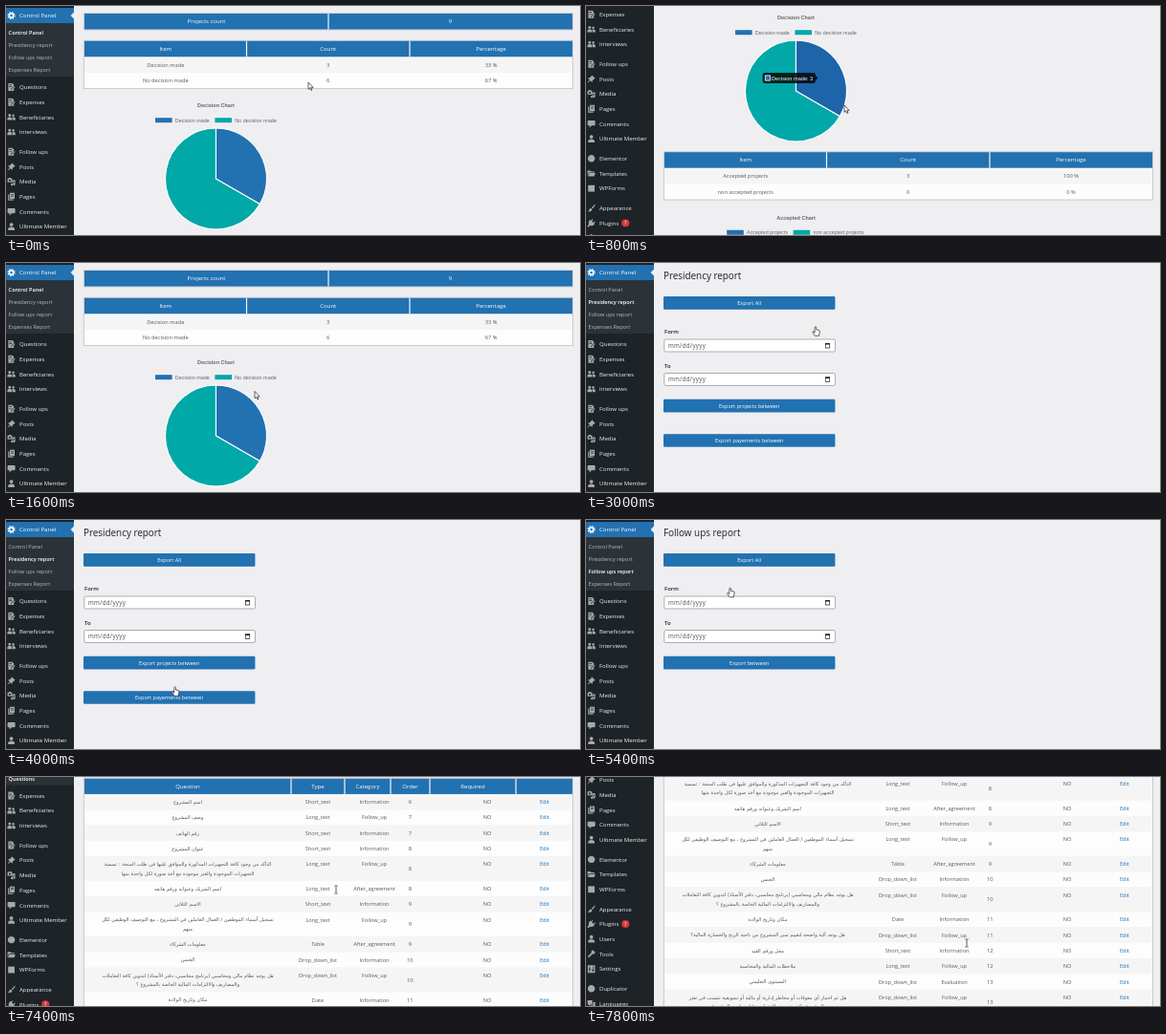
Recreate the animation shown at these times as an HTML page. Size 600 px wide and 240 px high, loop 8 s.

```html
<!DOCTYPE html>
<html lang="en">
<head>
<meta charset="utf-8">
<title>Control Panel</title>
<style>
html, body { margin: 0; width: 100%; height: 100%; overflow: hidden; background: #efeef1; }
svg { display: block; width: 100vw; height: 100vh; }
text { font-family: "Open Sans", "Noto Sans", sans-serif; white-space: pre; }
.chart { font-family: "Liberation Sans", Arial, sans-serif; }
.ar { font-family: "DejaVu Sans", sans-serif; direction: rtl; }
</style>
</head>
<body>
<svg id="stage" viewBox="0 0 600 240" preserveAspectRatio="none"></svg>
<script>
const NS = "http://www.w3.org/2000/svg";
const stage = document.getElementById("stage");
const BLUE = "#2271b1", TEAL = "#00a8a8", DARK = "#1d2327", SUB = "#2c3338", BG = "#efeef1";
const INK = "#555a60", GREY = "#a7aaad";
const LOOP = 8000, STEP = 200;

function el(parent, tag, attrs = {}, content) {
  const node = document.createElementNS(NS, tag);
  for (const k in attrs) node.setAttribute(k, attrs[k]);
  if (content !== undefined) node.textContent = content;
  return parent.appendChild(node);
}
const group = (p, attrs) => el(p, "g", attrs);
const rect = (p, x, y, w, h, fill, more) => el(p, "rect", { x, y, width: w, height: h, fill, ...more });
const path = (p, d, fill, more) => el(p, "path", { d, fill, ...more });

// y is the middle of the line
function label(p, str, x, y, size, fill, more) {
  return el(p, "text", { x, y: y + size * 0.36, "font-size": size, fill, ...more }, str);
}
const centred = (p, str, x, y, size, fill, more) =>
  label(p, str, x, y, size, fill, { "text-anchor": "middle", ...more });
const show = (node, on) => node.setAttribute("display", on ? "inline" : "none");

// ---------- sidebar ----------
const ICONS = {
  form: "M-3.2-4H1L2.6-2.4V-1L-.4 2V3H.8L2.6 1.4V4H-3.2ZM-2.2-2.4V-1.7H.6V-2.4ZM-2.2-.8V-.1H.4V-.8ZM3.2-.8L4 0 1 3 0 3.2.2 2.2Z",
  people: "M-1.8-3.4a1.5 1.5 0 1 0 .01 0ZM2-3a1.3 1.3 0 1 0 .01 0ZM-4.2 3.2V1.4Q-4 0-1.8 0T.6 1.4V3.2ZM1.2 3.2V1.4L.8.2Q4.2-.6 4.2 1.6V3.2Z",
  pin: "M.6-4L4-.6 2.9 0 1.2 1.7.9 3.6-1 1.8-3.7 4-4 3.7-1.8 1-3.6-.9-1.7-1.2 0-2.9Z",
  media: "M-4-3.4H-2.8L-2.3-4H-.8L-.3-3.4H.8V.6H-4ZM-1.6-2.4a1 1 0 1 0 .01 0ZM1.6-1.6H4V2.6a1.3 1.2 0 1 1-.9-1.1V0H2V3a1.3 1.2 0 1 1-.9-1.1V-1.6Z",
  pages: "M-1.6-4H3.4V2.4H-1.6ZM-.6-2.6V-2H2.4V-2.6ZM-.6-1V-.4H2.4V-1ZM-3.4-2.4H-2.2V3H2V4H-3.4Z",
  comment: "M-3.2-3.4H3.2Q4-3.4 4-2.6V1Q4 1.8 3.2 1.8H.4L-2 4V1.8H-3.2Q-4 1.8-4 1V-2.6Q-4-3.4-3.2-3.4Z",
  person: "M0-4a1.9 1.9 0 1 0 .01 0ZM-3.4 3.8V2Q-3 .3 0 .3T3.4 2V3.8Z",
  disc: "M0-3.7A3.7 3.7 0 1 0 .01-3.7Z",
  square: "M-3.4-3.4H3.4V3.4H-3.4Z",
  folder: "M-4-3H-1L0-2H3.2V-1H-2.6L-4 2.6ZM-2.2-.4H4.2L3 3H-3.6Z",
  brush: "M3.6-4L4.2-3.4 1.4.6.2-.4ZM-.4.2L.8 1.4Q.6 3.8-3.8 3.6-2.2 2.6-2 1.2-1.6 0-.4.2Z",
  plug: "M-.4-2.8L1.2-4.2 1.8-3.6.4-2 2-.4 3.6-1.8 4.2-1.2 2.8.4 3.4 1Q1.4 3.6-1 2.6L-3.4 4.2-4.2 3.4-2.6 1Q-3.6-1.4-1-3.4Z",
  wrench: "M1.4-4Q3-4.4 2.4-2.4L4-2.8Q4 .4 1 .2L-2.6 3.8-3.8 2.6-.2-1Q-.4-3.4 1.4-4Z",
  sliders: "M-3.8-4H3.8V4H-3.8ZM-2-3V-.4H-2.8V.6H-2V3H-1.4V.6H-.6V-.4H-1.4V-3ZM1.4-3V.8H.6V1.8H1.4V3H2V1.8H2.8V.8H2V-3Z",
  speech: "M-4-3.6H1V1H-1L-2.6 2.4V1H-4ZM1.8-1.4H4V2.8H3V4L1.4 2.8H-.8V1.8H1.8Z"
};
// "+" starts a new block of entries
const MENU = [
  ["Control Panel", "gear"], ["Questions", "form"], ["Expenses", "form"],
  ["Beneficiaries", "people"], ["Interviews", "people"],
  ["+Follow ups", "form"], ["Posts", "pin"], ["Media", "media"], ["Pages", "pages"],
  ["Comments", "comment"], ["Ultimate Member", "person"],
  ["+Elementor", "disc"], ["Templates", "folder"], ["WPForms", "square"],
  ["+Appearance", "brush"], ["Plugins", "plug"], ["Users", "person"],
  ["Tools", "wrench"], ["Settings", "sliders"],
  ["+Duplicator", "disc"], ["Languages", "speech"]
];
const REPORTS = ["Control Panel", "Presidency report", "Follow ups report", "Expenses Report"];

function icon(p, kind, y, fill) {
  const g = group(p, { transform: `translate(5.6 ${y})` });
  if (kind !== "gear") return path(g, ICONS[kind], fill, { "fill-rule": "evenodd" });
  el(g, "circle", { r: 2.1, fill: "none", stroke: fill, "stroke-width": 1.6 });
  el(g, "circle", { r: 3.4, fill: "none", stroke: fill, "stroke-width": 1.3, "stroke-dasharray": "1.4 1.27" });
}

function sidebar(p, active, subs, current) {
  rect(p, 0, -10, 71, 560, DARK);
  let y = 10;
  MENU.forEach(([raw, kind], i) => {
    const gap = raw[0] === "+", name = raw.replace("+", ""), on = name === active;
    if (gap) y += 4.9;
    if (on) {
      rect(p, 0, y - 8, 71, 16, BLUE);
      path(p, `M71 ${y - 3.4}L67.6 ${y}L71 ${y + 3.4}Z`, BG);
    }
    icon(p, kind, y, on ? "#fff" : GREY);
    label(p, name, 14, y, 6.05, on ? "#fff" : "#f0f0f1");
    if (name === "Plugins") {
      el(p, "circle", { cx: 41.3, cy: y, r: 4.1, fill: "#d63638" });
      centred(p, "7", 41.3, y, 5, "#fff");
    }
    if (on) {
      rect(p, 0, y + 8, 71, 17 + 13 * (subs.length - 1), SUB);
      subs.forEach((s, k) => label(p, s, 2.6, y + 18 + 13 * k, 5.6,
        k === current ? "#fff" : "#b9bcc0", { "font-weight": k === current ? 600 : 400 }));
      y += 20.3 + 13 * (subs.length - 1);
    }
    y += 15.7;
  });
}

// ---------- shared content ----------
function header(p, y, edges, names) {
  rect(p, edges[0], y, edges.at(-1) - edges[0], 16.5, BLUE);
  names.forEach((n, i) => {
    centred(p, n, (edges[i] + edges[i + 1]) / 2, y + 8.1, 6, "#fff");
    if (i) rect(p, edges[i] - 0.6, y, 1.2, 16.5, "#f4f6f9");
  });
}
const frame = (p, y, h) =>
  rect(p, 81.3, y, 511.2, h, "none", { stroke: "#c6c6cb", "stroke-width": 0.9 });

function summary(p, y, rows) {
  const edges = [82, 251.5, 422, 592];
  rect(p, 82, y + 16.5, 510, 16.7, "#f6f5f6");
  rect(p, 82, y + 33.2, 510, 16.5, "#fdfdfd");
  frame(p, y - 0.4, 50.3);
  header(p, y, edges, ["Item", "Count", "Percentage"]);
  rows.forEach((row, r) => row.forEach((cell, c) =>
    centred(p, cell, (edges[c] + edges[c + 1]) / 2, y + 25.2 + 16.3 * r, 5.7, INK)));
}

function legend(p, y, title, items) {
  centred(p, title, 219.5, y, 5.5, "#666", { class: "chart", "font-weight": 700 });
  items.forEach(([name, x, fill]) => {
    rect(p, x, y + 13.2, 17.6, 5, fill);
    label(p, name, x + 20.8, y + 15.8, 5.45, "#666", { class: "chart" });
  });
}

// ---------- pages ----------
const side = [], body = [];
let slice, tip;

function dashboard(p) {
  frame(p, 7.6, 17.3);
  header(p, 8, [82, 337, 592], ["Projects count", "9"]);
  summary(p, 36.7, [["Decision made", "3", "33 %"], ["No decision made", "6", "67 %"]]);
  legend(p, 104, "Decision Chart", [["Decision made", 156, BLUE], ["No decision made", 218.4, TEAL]]);

  const cx = 219.5, cy = 181, r = 53;
  const ex = cx + r * Math.sin(Math.PI * 2 / 3), ey = cy + r / 2;
  const edge = { stroke: "#fff", "stroke-width": 1.1 };
  const wedge = big => `M${cx} ${cy}V${cy - r}A${r} ${r} 0 ${big} ${big ? 0 : 1} ${ex} ${ey}Z`;
  path(p, wedge(1), TEAL, edge);
  slice = path(p, wedge(0), BLUE, edge);

  tip = group(p);
  path(tip, "M187 162H237.6Q240 162 240 164.4V165.2L242.5 167.5L240 169.8V170.6Q240 173 237.6 173H187Q184.6 173 184.6 170.6V164.4Q184.6 162 187 162Z", "#000", { "fill-opacity": 0.8 });
  rect(tip, 187.3, 164.9, 5.2, 5.2, BLUE, { stroke: "#fff", "stroke-width": 0.8 });
  label(tip, "Decision made: 3", 194, 167.5, 5.6, "#fff", { class: "chart" });

  summary(p, 245.2, [["Accepted projects", "3", "100 %"], ["non accepted projects", "0", "0 %"]]);
  legend(p, 313.6, "Accepted Chart", [["Accepted projects", 147.2, BLUE], ["non accepted projects", 216.6, TEAL]]);
}

function button(p, y, name) {
  rect(p, 81, y, 179.4, 13.6, BLUE, { rx: 1.2 });
  centred(p, name, 170.7, y + 6.8, 5.6, "#fff");
}
function dateField(p, y, name) {
  label(p, name, 82, y - 8, 5.9, DARK, { "font-weight": 600 });
  rect(p, 81.8, y, 178.7, 13, "#fff", { rx: 1.6, stroke: "#8c8f94", "stroke-width": 0.7 });
  label(p, "mm/dd/yyyy", 86, y + 6.4, 6.2, "#4a4f55", { "letter-spacing": 0.3 });
  rect(p, 250.3, y + 4.4, 4.4, 4.6, "none", { stroke: "#222", "stroke-width": 0.7 });
  rect(p, 250, y + 4, 5, 1.5, "#222");
}
function report(p, title, names) {
  label(p, title, 81, 13, 9.9, DARK);
  button(p, 35.1, "Export All");
  dateField(p, 80, "Form");
  dateField(p, 115.5, "To");
  names.forEach((n, i) => button(p, 142.8 + 36.4 * i, n));
}

const QUESTIONS = [
  ["اسم المشروع", "Short_text", "Information", 6],
  ["وصف المشروع", "Long_text", "Follow_up", 7],
  ["رقم الهاتف", "Short_text", "Information", 7],
  ["عنوان المشروع", "Short_text", "Information", 8],
  ["التأكد من وجود كافة التجهيزات المذكورة والموافق عليها في طلب المنحة : تسمية|التجهيزات الموجودة والغير موجودة مع أخذ صورة لكل واحدة منها", "Long_text", "Follow_up", 8],
  ["اسم الشريك وعنوانه ورقم هاتفه", "Long_text", "After_agreement", 8],
  ["الاسم الثلاثي", "Short_text", "Information", 9],
  ["تسجيل أسماء الموظفين / العمال العاملين في المشروع ، مع التوصيف الوظيفي لكل|منهم", "Long_text", "Follow_up", 9],
  ["معلومات الشركاء", "Table", "After_agreement", 9],
  ["الجنس", "Drop_down_list", "Information", 10],
  ["هل يوجد نظام مالي ومحاسبي (برنامج محاسبي، دفتر الأستاذ) لتدوين كافة التعاملات|والمصاريف والالتزامات المالية الخاصة بالمشروع ؟", "Drop_down_list", "Follow_up", 10],
  ["مكان وتاريخ الولادة", "Date", "Information", 11],
  ["هل يوجد آلية واضحة لتقييم سير المشروع من ناحية الربح والخسارة المالية؟", "Drop_down_list", "Follow_up", 11],
  ["محل ورقم القيد", "Short_text", "Information", 12],
  ["ملاحظات المالية والمحاسبة", "Long_text", "Follow_up", 12],
  ["المستوى التعليمي", "Drop_down_list", "Evaluation", 13],
  ["هل تم اختبار أي معوقات أو مخاطر إدارية أو مالية أو تسويقية تتسبب في تعثر|المشروع وكيف تمت معالجتها من قبل صاحب المشروع", "Drop_down_list", "Follow_up", 13]
];
function questions(p) {
  label(p, "Questions", 81, 20, 9.9, DARK);
  header(p, 43.6, [82, 298, 354, 402, 443, 533, 592], ["Question", "Type", "Category", "Order", "Required", ""]);
  let y = 60.1;
  QUESTIONS.forEach(([text, type, kind, n], i) => {
    const lines = text.split("|"), h = lines.length > 1 ? 25.7 : 16.3, mid = y + 8.1;
    rect(p, 82, y, 510.3, h, i % 2 ? "#fdfdfd" : "#f6f5f6");
    lines.forEach((s, k) => centred(p, s, 190, mid + 9.6 * k, 5.2, INK, { class: "ar" }));
    centred(p, type, 326, mid, 5.6, INK);
    centred(p, kind, 385, mid, 5.6, INK);
    centred(p, n, 422.3, y + h / 2, 5.8, INK);
    centred(p, "NO", 503, mid, 5.6, INK);
    centred(p, "Edit", 563, mid, 5.7, BLUE);
    y += h;
  });
  frame(p, 43.2, y - 43.2);
}

rect(stage, 0, 0, 600, 240, BG);
const PAGES = [
  dashboard,
  p => report(p, "Presidency report", ["Export projects between", "Export payements between"]),
  p => report(p, "Follow ups report", ["Export between"]),
  p => report(p, "Expenses report", ["Export between"]),
  questions
];
PAGES.forEach((draw, i) => {
  const g = body[i] = group(stage);
  draw(g);
  if (i < 4) sidebar(g, "Control Panel", REPORTS, i);
  else sidebar(g, "Questions", ["Questions"], 0);
});

const flyout = group(stage);
rect(flyout, 71, 77.5, 77, 20, "#000", { opacity: 0.15 });
rect(flyout, 71, 76.5, 76, 19.8, SUB);
label(flyout, "Questions", 79.6, 86.2, 5.6, "#c3c4c7");
rect(flyout, 0, 78, 71, 15, DARK);
icon(flyout, "form", 85, "#72aee6");
label(flyout, "Questions", 14, 85, 6.05, "#72aee6");

// ---------- pointer ----------
const pointer = group(stage);
const outline = { stroke: "#222", "stroke-width": 0.7, "stroke-linejoin": "round" };
const shapes = {
  arrow: path(pointer, "M0 0V7.3L1.7 5.8L2.8 8.4L4 7.9L2.9 5.4H5.1Z", "#fff", outline),
  hand: path(pointer, "M-.9.7Q0-.5.8.7V3.4L3.6 4Q4.4 4.2 4.3 5.2L3.6 9.8H-.7L-3.1 6.2Q-3.3 5.1-2.2 5.3L-.9 6.5Z", "#fff", outline),
  beam: path(pointer, "M-1.6-4H-.5L0-3.6L.5-4H1.6M0-3.6V3.6M-1.6 4H-.5L0 3.6L.5 4H1.6", "none", { stroke: "#333", "stroke-width": 0.8 })
};

// ---------- timeline ----------
const POINTER = [
  [0, 316, 80, "arrow"], [800, 270, 104, "arrow"], [1600, 260, 134.5, "arrow"],
  [2000, 180, 95, "arrow"], [2400, 38, 43, "hand"], [2800, 60, 44, "hand"],
  [3000, 240, 66.5, "hand"], [3200, 238, 70, "arrow"], [3600, 190, 148, "hand"],
  [4200, 170, 188, "hand"], [4400, 160, 228, "arrow"], [4800, 60, 70, "hand"],
  [5000, 32, 53, "hand"], [5200, 45, 55, "hand"], [5400, 150.8, 71, "hand"],
  [5600, 250, 105, "arrow"], [5800, 290, 125, "arrow"], [6200, 120, 80, "arrow"],
  [6400, 32, 66, "hand"], [6600, 30, 67, "hand"], [6800, 34, 84, "hand"],
  [7000, 267.5, 65, "arrow"], [7200, 300, 80, "arrow"], [7400, 345, 118, "beam"],
  [7800, 398, 174, "beam"]
];
const SCROLL = [[0, 0], [200, 0], [600, 92], [1200, 92], [1600, 0], [7200, 0], [7800, 126.4]];
const PAGE_STARTS = [0, 2800, 5200, 6600, 7200];

function at(keys, t, col) {
  const i = keys.findLastIndex(k => k[0] <= t), a = keys[i], b = keys[i + 1];
  return b ? a[col] + (b[col] - a[col]) * (t - a[0]) / (b[0] - a[0]) : a[col];
}

function render(ms) {
  const t = Math.floor((ms % LOOP) / STEP) * STEP;
  const page = PAGE_STARTS.findLastIndex(s => s <= t);
  const scroll = at(SCROLL, t, 1);
  body.forEach((g, i) => show(g, i === page));
  body[page].setAttribute("transform", `translate(0 ${-scroll})`);

  const hover = t >= 600 && t <= 1200;
  show(tip, hover);
  slice.setAttribute("fill", hover ? "#1e64a8" : BLUE);
  show(flyout, t >= 6800 && t < 7200);

  const kind = POINTER.findLast(k => k[0] <= t)[3];
  for (const k in shapes) show(shapes[k], k === kind);
  pointer.setAttribute("transform", `translate(${at(POINTER, t, 1)} ${at(POINTER, t, 2)})`);
}

const start = performance.now();
function tick() {
  render(performance.now() - start);
  requestAnimationFrame(tick);
}
tick();
</script>
</body>
</html>
```
